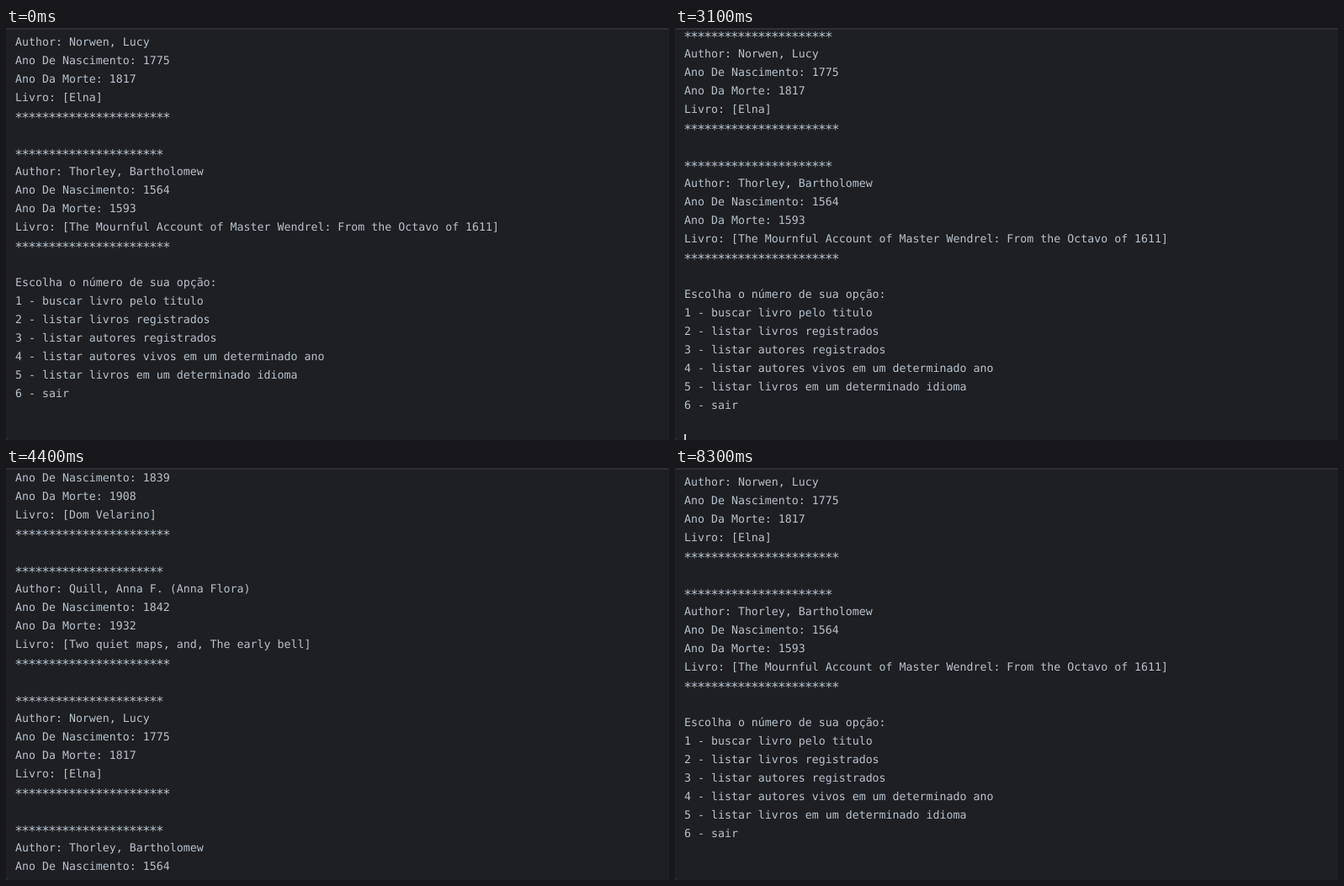
Animation, 788 px wide and 490 px high, one loop 8700 ms. Source, as an HTML page:

```html
<!DOCTYPE html>
<html lang="pt">
<head>
<meta charset="utf-8">
<title>Console</title>
<style>
  html, body { margin: 0; width: 100%; height: 100%; overflow: hidden; background: #1e1f22; }
  svg { display: block; width: 788px; height: 490px; }
  text {
    font: 13.27px "DejaVu Sans Mono", "Noto Sans Mono", monospace;
    fill: #b7c2cd;
    text-rendering: geometricPrecision;
  }
  .stars { font-size: 16px; letter-spacing: -1.64px; }
  .input { fill: #5fad65; }
</style>
</head>
<body>
<svg viewBox="0 0 788 490">
  <rect width="788" height="490" fill="#2d2f33"/>
  <path d="M0 2H788V490H5Q0 490 0 485Z" fill="#1e1f22"/>
  <clipPath id="pane"><rect y="3" width="788" height="487"/></clipPath>
  <g clip-path="url(#pane)">
    <g id="rows"></g>
    <rect id="caret" width="2" height="18" fill="#ced0d6"/>
  </g>
</svg>
<script>
const LOOP = 8700, PITCH = 22, LEFT = 11, LAST_BASE = 483, CARET_TOP = 469;

const block = (author, born, died, book) => [
  "*".repeat(22),
  "Author: " + author,
  "Ano De Nascimento: " + born,
  "Ano Da Morte: " + died,
  "Livro: [" + book + "]",
  "*".repeat(23),
  ""
];

const authors = [
  ["Teodoro de Varim", 1839, 1908, "Dom Velarino"],
  ["Teodoro de Varim", 1839, 1908, "Dom Velarino"],
  ["Quill, Anna F. (Anna Flora)", 1842, 1932, "Two quiet maps, and, The early bell"],
  ["Norwen, Lucy", 1775, 1817, "Elna"],
  ["Thorley, Bartholomew", 1564, 1593, "The Mournful Account of Master Wendrel: From the Octavo of 1611"]
].flatMap(a => block(...a));

const menu = [
  "Escolha o número de sua opção:",
  "1 - buscar livro pelo titulo",
  "2 - listar livros registrados",
  "3 - listar autores registrados",
  "4 - listar autores vivos em um determinado ano",
  "5 - listar livros em um determinado idioma",
  "6 - sair",
  ""
];

// The last line of every log is the one holding the prompt.
const ready = [...authors, ...menu, ""];
const typed = [...authors, ...menu, "3"];
const entered = [...typed, ""];
const listed = [...typed, ...authors, ""];

const logs = [[0, ready], [1300, typed], [1700, entered], [1900, listed], [2000, ready]];

const scrolls = [
  [0, 0], [3100, 14], [3200, 67], [3500, 81], [3600, 150], [3700, 221],
  [3800, 255], [3900, 267], [4400, 281], [4500, 318], [4600, 333], [5000, 400],
  [7200, 345], [7300, 200], [7400, 60], [7500, 0]
];

// Caret position as [x, top], or null while hidden.
const home = [LEFT, CARET_TOP];
const carets = [
  [0, null], [300, [586, 227]], [600, home], [1200, null], [1300, [18, CARET_TOP]],
  [1700, home], [2700, null], [3100, home], [7200, null], [7800, home], [8300, null]
];

const at = (steps, t) => steps.findLast(s => s[0] <= t)[1];

const caret = document.getElementById("caret");
const rows = Array.from({ length: 25 }, () => {
  const row = document.createElementNS("http://www.w3.org/2000/svg", "text");
  return document.getElementById("rows").appendChild(row);
});

function draw(t) {
  const log = at(logs, t), scroll = at(scrolls, t), pos = at(carets, t);
  const end = log.length - 1;
  const skip = Math.floor(scroll / PITCH);

  rows.forEach((row, k) => {
    const up = skip - 1 + k;
    const line = log[end - up] || "";
    const stars = line[0] === "*";
    if (row.textContent !== line) row.textContent = line;
    // Larger stars keep the column pitch and sit centred on the line.
    row.setAttribute("x", stars ? LEFT - 0.82 : LEFT);
    row.setAttribute("y", LAST_BASE - up * PITCH + scroll + (stars ? 3 : 0));
    row.setAttribute("class", stars ? "stars" : line === "3" ? "input" : "");
  });

  caret.setAttribute("visibility", pos ? "visible" : "hidden");
  if (pos) {
    caret.setAttribute("x", pos[0]);
    caret.setAttribute("y", pos[1] + scroll);
  }
}

const start = performance.now();
function tick() {
  draw((performance.now() - start) % LOOP);
  requestAnimationFrame(tick);
}
tick();
</script>
</body>
</html>
```
